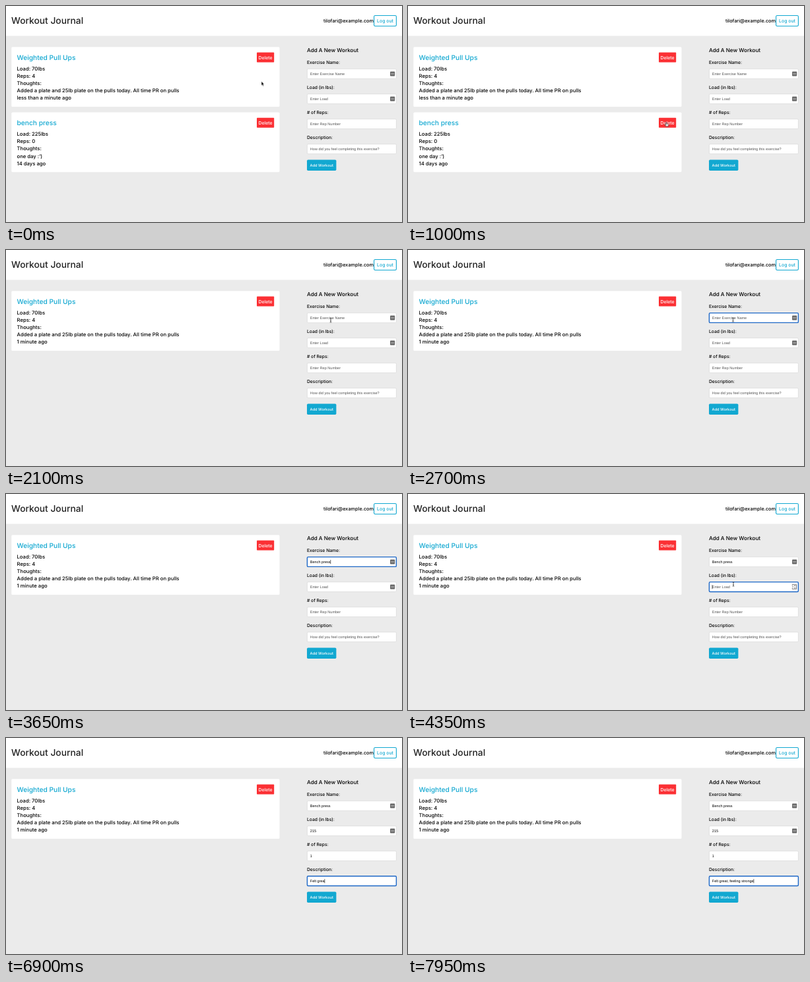
Animation of 600x328 px, one loop 8 s. Source, as an HTML page:

```html
<!DOCTYPE html>
<html lang="en">
<head>
<meta charset="utf-8">
<title>Workout Journal</title>
<style>
  html, body { margin: 0; width: 100%; height: 100%; overflow: hidden; background: #ebebeb; }
  svg { display: block; width: 600px; height: 328px; }
  text { font: 500 7.7px Inter, sans-serif; text-rendering: geometricPrecision; white-space: pre; }
  .title { font-size: 13.8px; fill: #222; }
  .name { font-size: 10.2px; fill: #12a8d1; }
  .email { font-size: 7.3px; text-anchor: end; }
  .logout { font-size: 6.9px; fill: #12a8d1; text-anchor: middle; }
  .delete { font-size: 6.9px; fill: #fff; text-anchor: middle; }
  .heading { font-size: 8.1px; }
  .label { font-size: 6.75px; }
  .button { font-size: 5.7px; fill: #fff; text-anchor: middle; }
  .value { font: 5.55px "Liberation Sans", Arial, sans-serif; }
  .hint { fill: #555; }
  .box { fill: #fff; stroke: #d4d4d4; stroke-width: .6; }
  .focused .box { stroke: #1d67c6; stroke-width: 1.4; }
  .spinner { fill: none; stroke: #444; stroke-width: .7; }
  #cursor { animation: travel 8s linear infinite; }
  @keyframes travel {
    0%, .6% { transform: translate(387px, 114.5px); }
    3.75%, 6.25% { transform: translate(388.5px, 128px); }
    9.4%, 11.25% { transform: translate(391px, 160px); }
    12.5% { transform: translate(391.5px, 177.5px); }
    14.4%, 16.2% { transform: translate(391.5px, 178.5px); }
    20% { transform: translate(448px, 140px); }
    25% { transform: translate(491px, 108px); }
    26.9%, 48% { transform: translate(492.5px, 106px); }
    53%, 63% { transform: translate(493px, 137px); }
    66.3%, 72% { transform: translate(495px, 177px); }
    74.4% { transform: translate(497px, 213.5px); }
    76%, 100% { transform: translate(497px, 216px); }
  }
</style>
</head>
<body>
<svg viewBox="0 0 600 328">
  <rect width="600" height="328" fill="#ebebeb"/>
  <rect width="600" height="45.4" fill="#fff"/>
  <text class="title" x="8" y="27.4">Workout Journal</text>
  <text class="email" x="557" y="24.9">tilofari@example.com</text>
  <rect x="557.6" y="14.5" width="33.8" height="16" rx="1.7" fill="#fff" stroke="#12a8d1" stroke-width="1.1"/>
  <text class="logout" x="574.5" y="24.9">Log out</text>

  <g id="cards"></g>

  <text class="heading" x="456" y="70.4">Add A New Workout</text>
  <g id="form"></g>
  <rect x="456" y="233.6" width="44.4" height="16.4" rx="1.7" fill="#12a8d1"/>
  <text class="button" x="478.2" y="243.8">Add Workout</text>

  <g id="cursor">
    <path id="arrow" d="M0 0V6.2L1.4 5L2.4 7.2L3.4 6.8L2.5 4.6H4.4Z" stroke="#fff" stroke-width=".5"/>
    <path id="hand" d="M-.8 3V-.8Q-.2 -1.6 .4 -.8V1.2L2.8 1.7Q3.4 2 3.3 2.8L2.7 5.2H-.6L-2.4 2.6Q-2 1.8 -.8 3Z" fill="#fff" stroke="#000" stroke-width=".6"/>
    <path id="beam" d="M-1.3 -3.2Q0 -3.2 0 -2.4Q0 -3.2 1.3 -3.2M0 -2.4V2.4M-1.3 3.2Q0 3.2 0 2.4Q0 3.2 1.3 3.2M-.7 .9H.7" fill="none" stroke="#222" stroke-width=".7"/>
  </g>
</svg>
<script>
  const LOOP = 8000, DELETED_AT = 1100;
  const $ = id => document.getElementById(id);
  const show = (el, on) => el && el.setAttribute("visibility", on ? "visible" : "hidden");

  const cards = [
    ["Weighted Pull Ups", "Load: 70lbs", "Reps: 4", "Thoughts:",
     "Added a plate and 25lb plate on the pulls today. All time PR on pulls", "less than a minute ago"],
    ["bench press", "Load: 225lbs", "Reps: 0", "Thoughts:", "one day :’)", "14 days ago"]
  ];

  $("cards").innerHTML = cards.map(([name, ...lines], i) => `
    <g transform="translate(0 ${i * 99.2})">
      <rect x="8.3" y="62.3" width="406.2" height="90.8" rx="1.7" fill="#fff"/>
      <text class="name" x="16.5" y="81.6">${name}</text>
      ${lines.map((line, n) => `<text x="16.5" y="${98.2 + n * 11.05}">${line}</text>`).join("")}
      <rect x="380" y="70.5" width="26.2" height="15" rx=".8" fill="#fb3034"/>
      <text class="delete" x="393.1" y="80.5">Delete</text>
    </g>`).join("");
  const [firstCard, secondCard] = $("cards").children;
  const age = firstCard.querySelectorAll("text")[5];

  // focus: [from, to]; typing: [first key, ms per key]
  const fields = [
    { label: "Exercise Name:", hint: "Enter Exercise Name", text: "Bench press", focus: [2150, 4250], typing: [2820, 68], icon: true },
    { label: "Load (in lbs):", hint: "Enter Load", text: "215", focus: [4250, 5350], typing: [4600, 140], icon: true, number: true },
    { label: "# of Reps:", hint: "Enter Rep Number", text: "1", focus: [5350, 6150], typing: [5600, 100], number: true },
    { label: "Description:", hint: "How did you feel completing this exercise?", text: "Felt great, feeling stronge", focus: [6150, LOOP], typing: [6400, 56] }
  ];

  const icon = `<g class="icon">
    <rect x="582" y="99.5" width="7.2" height="7" rx="1" fill="#6a6a6a"/>
    <path d="M583.4 103h1.1m.6 0h1.1m.6 0h1.1" stroke="#fff" stroke-width="1"/></g>`;
  const spinner = hasIcon => `<g class="spinner">
    ${hasIcon ? '<path d="M582.3 101V99.6H588.6V106.2H582.3V104.8M582 102.9H584"/>' : ""}
    <path d="M${hasIcon ? 585 : 583} 102l1.2 -1.3l1.2 1.3m0 1.9l-1.2 1.3l-1.2 -1.3"/></g>`;

  $("form").innerHTML = fields.map((f, i) => `
    <g transform="translate(0 ${i * 38.05})">
      <text class="label" x="456" y="88.3">${f.label}</text>
      <rect class="box" x="456.4" y="95.6" width="135" height="14.8" rx="1.5"/>
      <text class="value" x="460.8" y="105"></text>
      <rect class="caret" y="100" width=".6" height="6.2"/>
      ${f.icon ? icon : ""}${f.number ? spinner(f.icon) : ""}
    </g>`).join("");

  fields.forEach((f, i) => {
    f.group = $("form").children[i];
    for (const part of ["value", "caret", "icon", "spinner"])
      f[part] = f.group.querySelector("." + part);
  });

  const pointers = [
    [0, "arrow"], [950, "hand"], [1150, "arrow"], [1850, "beam"], [2800, ""], [3750, "beam"],
    [4550, ""], [5050, "beam"], [5550, ""], [5720, "beam"], [6300, ""]
  ];

  function drawField(f, t) {
    const [start, step] = f.typing;
    const typed = Math.min(f.text.length, Math.max(0, Math.floor((t - start) / step) + 1));
    const focused = t >= f.focus[0] && t < f.focus[1];
    const typing = t >= start && t < start + step * f.text.length + 200;
    f.value.textContent = typed ? f.text.slice(0, typed) : f.hint;
    f.value.classList.toggle("hint", !typed);
    f.group.classList.toggle("focused", focused);
    show(f.caret, focused && (typing || (t - f.focus[0]) % 1000 < 500));
    f.caret.setAttribute("x", 460.7 + (typed ? f.value.getComputedTextLength() : 0));
    show(f.spinner, focused && f.number);
    show(f.icon, !(focused && f.number));
  }

  function draw() {
    const t = performance.now() % LOOP;
    show(secondCard, t < DELETED_AT);
    age.textContent = t < DELETED_AT ? "less than a minute ago" : "1 minute ago";
    fields.forEach(f => drawField(f, t));
    const pointer = pointers.filter(([from]) => from <= t).pop()[1];
    for (const id of ["arrow", "hand", "beam"]) show($(id), id === pointer);
    requestAnimationFrame(draw);
  }
  draw();
</script>
</body>
</html>
```
